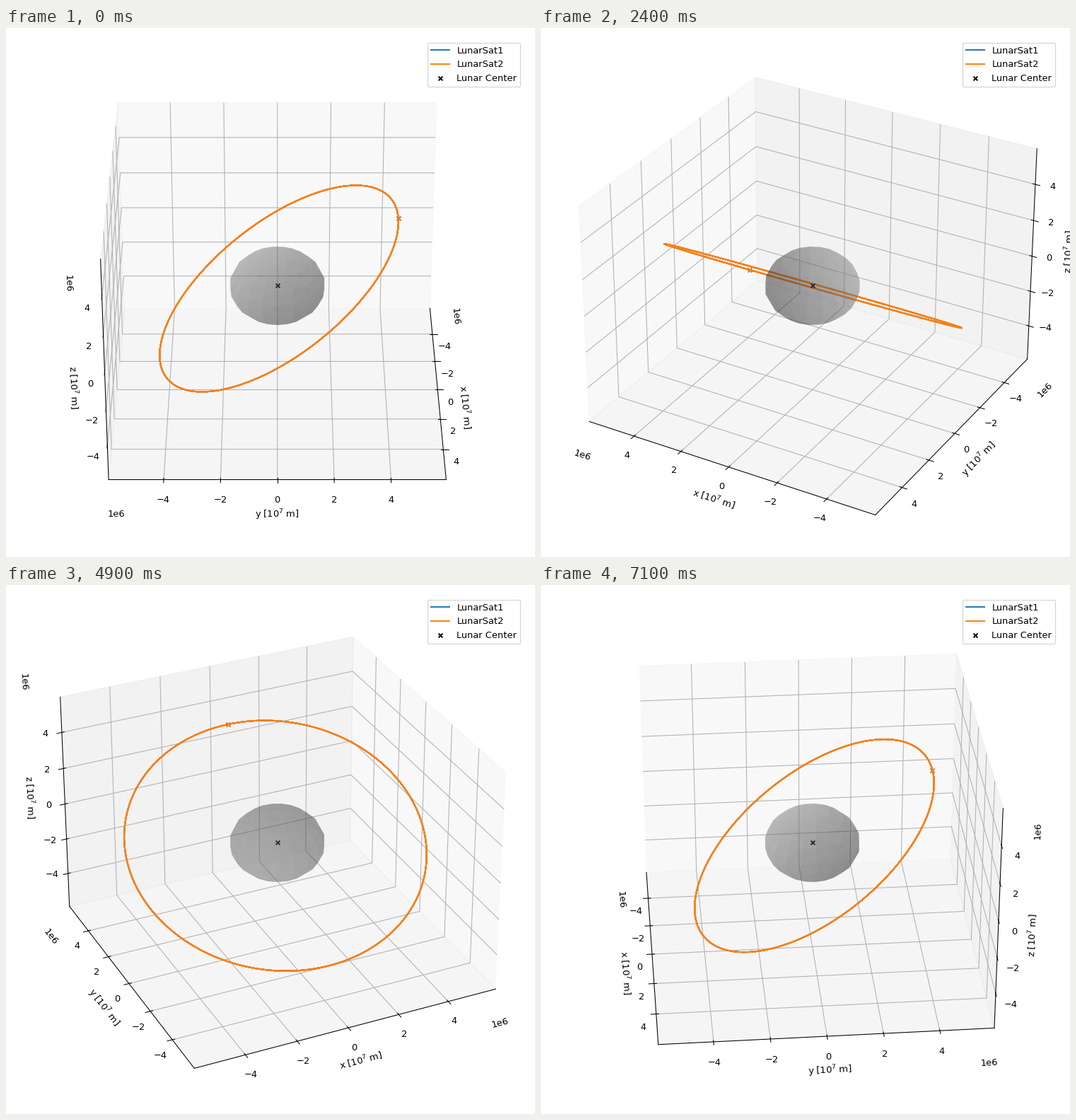
Write a matplotlib script that moves like this. It is 748x748 px and loops after 7200 ms.

```python
import numpy as np
import matplotlib.pyplot as plt
from matplotlib.animation import FuncAnimation
from matplotlib.transforms import IdentityTransform, blended_transform_factory

FRAMES, INTERVAL = 72, 100
MOON_RADIUS = 1.7374e6
ORBIT_RADIUS = 5.7012e6
INCLINATION = np.radians(40.7)
LIMIT = ORBIT_RADIUS * 25 / 24
PAD = 0.01875


def orbit(angle):
    """Point on the circular orbit, tilted about the x axis."""
    y = np.sin(angle)
    return ORBIT_RADIUS * np.array(
        [np.cos(angle), y * np.cos(INCLINATION), y * np.sin(INCLINATION)])


fig = plt.figure(figsize=(8, 8), dpi=93.5)
ax = fig.add_axes([PAD, PAD, 1 - 2 * PAD, 1 - 2 * PAD], projection="3d")

# The moon as a coarse translucent sphere
u, v = np.mgrid[0:2 * np.pi:20j, 0:np.pi:10j]
ax.plot_surface(MOON_RADIUS * np.cos(u) * np.sin(v),
                MOON_RADIUS * np.sin(u) * np.sin(v),
                MOON_RADIUS * np.cos(v), color="gray", alpha=0.3)

# Both satellites share one orbit and one position
path = orbit(np.linspace(0, 6 * np.pi, 901))
position = orbit(np.pi / 2)
for name, color in (("LunarSat1", "C0"), ("LunarSat2", "C1")):
    ax.plot(*path, color=color, label=name)
    ax.scatter(*position, color=color, marker="x")
ax.scatter(0, 0, 0, color="black", marker="x", label="Lunar Center")

ax.set(xlim=(-LIMIT, LIMIT), ylim=(-LIMIT, LIMIT), zlim=(-LIMIT, LIMIT),
       xlabel="x [$10^7$ m]", ylabel="y [$10^7$ m]", zlabel="z [$10^7$ m]")
ax.legend(loc="upper right")

# Exponent labels sit on the bottom edge of the figure
edge = blended_transform_factory(ax.transAxes, IdentityTransform())
for axis in (ax.xaxis, ax.yaxis, ax.zaxis):
    axis.offsetText.set_transform(edge)


def update(i):
    # A tiny turn at the start settles which side wall is the far one
    ax.view_init(elev=30, azim=max(360 * i / FRAMES, 1e-4))
    return []


anim = FuncAnimation(fig, update, frames=FRAMES, interval=INTERVAL,
                     init_func=lambda: update(0), repeat=True,
                     repeat_delay=0, blit=False)
plt.show()
```
